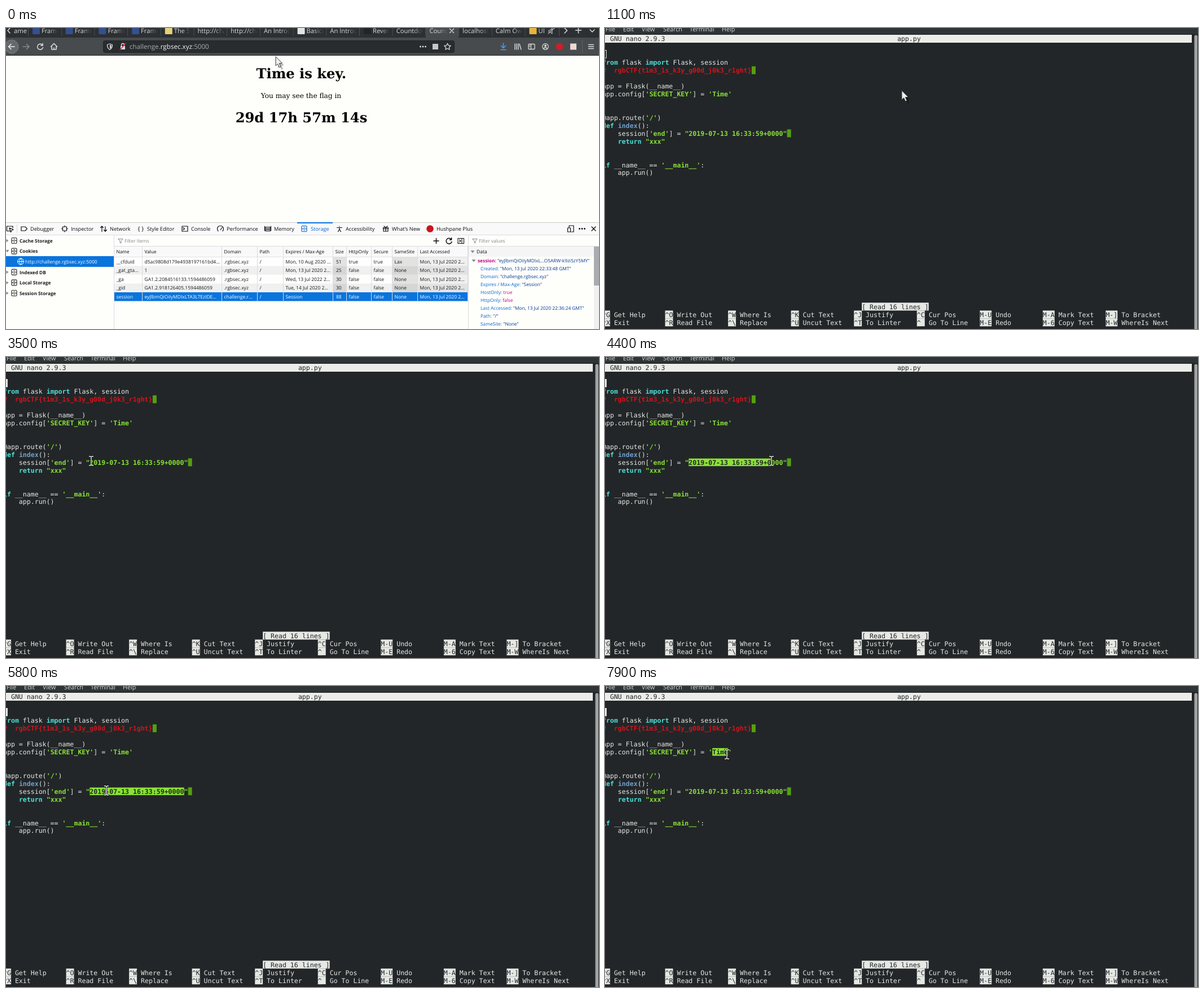
Write an HTML page that moves like this. It is 1051 by 533 pixels and loops after 8000 ms.

```html
<!DOCTYPE html>
<html lang="en">
<head>
<meta charset="utf-8">
<title>Time is key</title>
<style>
  html, body { margin: 0; width: 100%; height: 100%; overflow: hidden; background: #222628; }
  svg { display: block; }
  text { white-space: pre; text-rendering: geometricPrecision; font-family: "Open Sans", "Noto Sans", sans-serif; }
  .mono { font-family: "DejaVu Sans Mono", monospace; font-size: 11.577px; }
  .serif { font-family: "DejaVu Serif", "Noto Serif", serif; text-anchor: middle; }
  .b { font-weight: 700; }
</style>
</head>
<body>
<svg id="stage" width="1051" height="533" viewBox="0 0 1051 533"></svg>
<script>
const LOOP = 8000;
const rect = (x, y, w, h, fill, extra = '') =>
  `<rect x="${x}" y="${y}" width="${w}" height="${h}" fill="${fill}" ${extra}/>`;
const text = (x, y, s, size, fill, cls = '') =>
  `<text x="${x}" y="${y}" font-size="${size}" fill="${fill}" class="${cls}">${s}</text>`;
const line = (d, color, width = 1.2, fill = 'none') =>
  `<path d="${d}" stroke="${color}" stroke-width="${width}" fill="${fill}" stroke-linecap="round" stroke-linejoin="round"/>`;
const dot = (x, y, r, fill, extra = '') => `<circle cx="${x}" cy="${y}" r="${r}" fill="${fill}" ${extra}/>`;
const at = (x, y, s) => `<g transform="translate(${x} ${y})">${s}</g>`;

/* ---------- browser ---------- */
const INK = '#0c0c0d', LIGHT = '#dcdddd', BLUE = '#0a74dd', LINK = '#0a66cf', STRIP = '#2c3032', BAR = '#484b4d', EDGE = '#dcdce0';
const reload = (x, y, c) => at(x, y, line('M4 -3A5 5 0 1 0 5 1.5M4.6 -5.4V-2H1.2', c, 1.5));
const cross = (x, y, r, c) => at(x, y, line(`M${-r} ${-r}L${r} ${r}M${r} ${-r}L${-r} ${r}`, c, 1.4));
const plus = (x, y, r, c) => at(x, y, line(`M${-r} 0H${r}M0 ${-r}V${r}`, c, 1.5));
const dots = (x, y, c) => dot(x - 4.5, y, 1.4, c) + dot(x, y, 1.4, c) + dot(x + 4.5, y, 1.4, c);

function star(x, y, r) {
  const point = i => {
    const a = i * Math.PI / 5, d = i % 2 ? r / 2 : r;
    return `${x + d * Math.sin(a)} ${y - d * Math.cos(a)}`;
  };
  return line('M' + Array.from({ length: 10 }, (_, i) => point(i)).join('L') + 'Z', LIGHT);
}

function tabStrip() {
  const step = 58.7;
  const labels = 'Frame,Frame,Frame,Frame,The Sky,http://cha,http://cha,An Introd,Basics,An Introd,Reverse,Countdown,Countd,localhost,Calm Owl,UI'.split(',');
  const icons = { Frame: '#35508f', 'The Sky': '#e5d27a', Basics: '#e4e4e4', Reverse: '#222526', UI: '#e8b43c' };
  let s = rect(0, 0, 1051, 18, STRIP) + text(14, 9, 'ame', 11.2, LIGHT);
  labels.forEach((label, i) => {
    const active = label === 'Countd', bg = active ? BAR : STRIP, icon = icons[label], end = active ? 38 : 53;
    s += `<svg x="${39 + step * i}" y="0" width="${step}" height="18">` + rect(0, 0, step, 18, bg) +
      (icon ? rect(8, 0, 13, 11, icon, 'rx="1"') : '') + text(icon ? 24 : 7, 9, label, 11.2, LIGHT) +
      rect(end - 15, 0, 15, 17, `url(#${active ? 'fadeOn' : 'fadeOff'})`) + rect(end, 0, 30, 18, bg) +
      rect(0, 0, 1, 14, '#515557') + '</svg>';
  });
  s += rect(980, 0, 1, 14, '#515557') + rect(0, 0, 11, 17, STRIP) + line('M7 0L3 4.5L7 9', LIGHT, 1.5);
  s += line('M990 0L994.5 4.5L990 9', LIGHT, 1.5) + plus(1014.5, 4, 5, LIGHT) + line('M1035 3L1039 7L1043 3', LIGHT, 1.5);
  return s + cross(790, 5, 3.5, LIGHT) + line('M962 4H964L968 1V10L964 7H962ZM961 10L972 0', '#b8baba', 1.1);
}

function navBar() {
  let s = rect(0, 17, 1051, 32, BAR) + rect(0, 48, 1051, 1, '#2a2c2e');
  s += dot(10, 33, 12, '#66696b', 'stroke="#7c7f81"') + line('M15 33H5M9 28.5L4.5 33L9 37.5', '#eee', 1.6);
  s += line('M30 33H40M36.5 28.5L41 33L36.5 37.5', '#86898a', 1.6) + reload(60.5, 33, LIGHT);
  s += line('M79.5 33L85 27.5L90.5 33M81 33V38H89V33M85 38V35', LIGHT, 1.6);
  s += rect(172.5, 22.5, 622, 21, '#292c2e', 'rx="3" stroke="#222527"');
  s += line('M184 28L188.5 29.5Q188.5 36 184 38.5Q179.5 36 179.5 29.5Z', LIGHT, 1.3) + rect(184, 30, 2.5, 6, LIGHT);
  s += rect(203, 32, 8, 6, LIGHT) + line('M204.5 32V30A2.5 2.5 0 0 1 209.5 30V32', LIGHT, 1.3) + line('M202 38.5L212 27.5', '#e22850', 1.5);
  s += `<text x="219" y="37" font-size="11.65" fill="#a9acad">challenge.<tspan fill="#f4f4f4">rgbsec.xyz</tspan>:5000</text>`;
  s += dots(739, 33, LIGHT) + rect(756, 28, 10, 10, '#c4c6c7') + star(782.5, 33.3, 6);
  s += line('M881.5 27V35M877.5 31.5L881.5 35.5L885.5 31.5M877 38.5H886', '#45a1ff', 1.5);
  s += line('M902 28V38M905 28V38M908 28V38M910 28.5L913 38', LIGHT, 1.4);
  s += rect(926, 28.5, 11, 9, 'none', `rx="1" stroke="${LIGHT}" stroke-width="1.3"`) + line('M930.5 29V37M927.5 31H929M927.5 33H929', LIGHT);
  s += dot(956, 33, 5.3, 'none', `stroke="${LIGHT}" stroke-width="1.2"`) + dot(956, 31.5, 2, LIGHT) + line('M953 36Q956 33.5 959 36', LIGHT, 1.6);
  s += dot(981, 33, 6.3, '#d41c25') + rect(1000, 27.5, 11, 11, '#eed9d2') + rect(1021, 21, 1, 24, '#5f6264');
  return s + line('M1032.5 29.5h9m-9 3.5h9m-9 3.5h9', LIGHT, 1.5);
}

const drawer = (x, y, c) => at(x, y, rect(-4.5, -5, 9, 10, 'none', `rx="1.5" stroke="${c}" stroke-width="1.2"`) +
  line('M-4 0h8M-1 -2.5h2M-1 2.5h2', c, 1.1));

function toolTabs() {
  const tabs = {
    Debugger: 43, Inspector: 115, Network: 184, 'Style Editor': 250, Console: 328, Performance: 391,
    Memory: 475, Storage: 540, Accessibility: 602, 'What’s New': 684, 'Hushpane Plus': 763
  };
  const icon = (name, d) => at(tabs[name] - 11, 355.5, line(d, INK));
  let s = rect(0, 344, 1051, 1, '#c8c8cc') + rect(0, 345, 1051, 22, '#f9f9fa') + rect(0, 366, 1051, 1, EDGE) + rect(516, 344, 63, 2, BLUE);
  s += line('M7 359.5H1.5V351H12V354M6 354L13 357L10 358.5L8.5 361.5Z', INK) + rect(19, 348, 1, 15, EDGE);
  for (const name in tabs) s += text(tabs[name], 358.8, name, 9.2, name === 'Storage' ? LINK : INK);
  s += icon('Debugger', 'M-5 -3.5H2L5.5 0L2 3.5H-5Z');
  s += icon('Inspector', 'M-3.5 -3.5h7v7h-7ZM0 -5.5v2M0 3.5v2M-5.5 0h2M3.5 0h2');
  s += icon('Network', 'M-3 5V-4M-5.5 -2L-3 -4.5L-.5 -2M3 -4V5M.5 2L3 4.5L5.5 2');
  s += text(233.5, 359, '{ }', 10.5, INK);
  s += icon('Console', 'M-5 -4.5H5V4.5H-5ZM-3 -2L-.5 0L-3 2');
  s += icon('Performance', 'M-4 4A5.5 5.5 0 1 1 4 4M0 2L3 -2');
  s += icon('Memory', 'M-4 -3h8v7h-8ZM-2 -1v3M0 -1v3M2 -1v3M-5.5 -4.5v8M5.5 -4.5v8');
  s += drawer(528.5, 355.5, LINK);
  s += icon('Accessibility', 'M-4.5 -2h9M0 -2v3l-2.5 4M0 1l2.5 4M0 -4.5v.5');
  s += icon('What’s New', 'M-4.5 -2h9v2h-9ZM-4 0v4.5h8V0M0 4.5V-2l-3 -2.5M0 -2l3 -2.5');
  s += dot(751.5, 355.5, 6.3, '#c9151e') + line('M998 353V350H1006V361H1002M995.5 354h5v7h-5Z', INK);
  return s + dots(1021, 355.5, INK) + cross(1041.5, 355.5, 3.5, INK);
}

function sideBar() {
  let s = rect(191, 367, 1, 166, EDGE) + rect(0, 404, 191, 19, BLUE);
  ['Cache Storage', 'Cookies', '', 'Indexed DB', 'Local Storage', 'Session Storage'].forEach((name, i) => {
    const y = 376.5 + 18.6 * i, arrow = name === 'Cookies' ? 'M-2 -2H4L1 2.5Z' : 'M-1 -3L3 0L-1 3Z';
    if (name) s += text(24, y + 3.2, name, 8.3, '#1c1c1e', 'b') + drawer(14.5, y, '#2a2a2e') + at(1.5, y, `<path d="${arrow}" fill="#8b8b90"/>`);
  });
  return s + dot(26, 413.5, 5.5, 'none', 'stroke="#fff"') + at(26, 413.5, line('M-5.5 0h11M0 -5.5Q-5 0 0 5.5Q5 0 0 -5.5', '#fff', 1)) +
    text(34, 416.6, 'http://challenge.rgbsec.xyz:5000', 8.5, '#fff');
}

const funnel = x => at(x, 377, line('M-4 -3.5H4L1 .5V4L-1 3V.5Z', '#8b8b90', 1));

function cookieTable() {
  const cols = [192, 242, 383, 446, 492, 580, 604, 648, 685, 730, 819];
  const heads = 'Name,Value,Domain,Path,Expires / Max-Age,Size,HttpOnly,Secure,SameSite,Last Accessed'.split(',');
  const cookie = (name, value, expires, size, flag = 'false', site = 'None', domain = '.rgbsec.xyz') =>
    [name, value, domain, '/', expires, size, flag, flag, site, 'Mon, 13 Jul 2020 2...'];
  const rows = [
    cookie('__cfduid', 'd5ac9808d179e4938197161bd4...', 'Mon, 10 Aug 2020 ...', 51, 'true', 'Lax'),
    cookie('_gat_gta...', '1', 'Mon, 13 Jul 2020 2...', 25),
    cookie('_ga', 'GA1.2.2084516133.1594486059', 'Wed, 13 Jul 2022 2...', 30),
    cookie('_gid', 'GA1.2.918126405.1594486059', 'Tue, 14 Jul 2020 2...', 30),
    cookie('session', 'eyJlbmQiOiIyMDIxLTA3LTEzIDE...', 'Session', 88, 'false', 'None', 'challenge.r...')
  ];
  let s = funnel(203) + text(210, 380, 'Filter Items', 8.4, '#87878b') + plus(762.5, 377, 4.5, INK) + reload(785, 377, INK) +
    line('M801 372.5h10.5v9h-10.5ZM808 373v8M803.5 375l2.5 2l-2.5 2', INK, 1.1);
  s += rect(192, 386, 627, 20, '#f9f9fa') + rect(192, 386, 859, 1, EDGE) + rect(192, 405, 627, 1, EDGE);
  rows.forEach((row, r) => {
    const y = 405.8 + 15.55 * r, chosen = r === 4;
    s += rect(192, y, 627, 15.55, chosen ? BLUE : r % 2 ? '#f0f0f1' : '#fefefd');
    row.forEach((cell, c) => {
      const shade = { Size: .11, SameSite: .11, 'Last Accessed': .06 }[heads[c]];
      if (shade && !chosen) s += rect(cols[c], y, cols[c + 1] - cols[c], 15.55, `rgba(0,0,0,${shade})`);
      s += text(cols[c] + (c === 5 ? 5 : 3.5), y + 10.8, cell, 8.5, chosen ? '#fff' : '#18181a');
    });
  });
  heads.forEach((head, c) => s += text(cols[c] + 3.5, 399, head, 8.25, INK) + rect(cols[c + 1] - 1, 387, 1, 96, EDGE));
  return s;
}

function dataPanel() {
  const rows = {
    'Created:': '"Mon, 13 Jul 2020 22:33:48 GMT"', 'Domain:': '"challenge.rgbsec.xyz"', 'Expires / Max-Age:': '"Session"', 'HostOnly:': 'true',
    'HttpOnly:': 'false', 'Last Accessed:': '"Mon, 13 Jul 2020 22:36:24 GMT"', 'Path:': '"/"', 'SameSite:': '"None"'
  };
  const pair = (x, y, key, value, keyStyle) =>
    `<text x="${x}" y="${y}" font-size="8.3"><tspan ${keyStyle}>${key}</tspan> <tspan fill="${value[0] === '"' ? '#003a91' : '#c4008a'}">${value}</tspan></text>`;
  const open = (x, y) => at(x, y, '<path d="M-3.5 -2h7L0 2.5Z" fill="#8b8b90"/>');
  let s = rect(819, 367, 1, 166, EDGE) + funnel(831) + text(838, 380, 'Filter values', 8.4, '#87878b');
  s += rect(820, 387, 231, 18, '#f5f5f6') + open(827, 396) + text(834, 399, 'Data', 8.5, INK);
  s += open(829, 412) + pair(836, 415.2, 'session:', '"eyJlbmQiOiIyMDIxL...O5ARW-k9zi5zY5MY"', 'class="b" fill="#c4008a"');
  Object.keys(rows).forEach((key, i) => s += pair(841, 429.2 + 13.95 * i, key, rows[key], `fill="${LINK}"`));
  return s + rect(1042, 387, 9, 146, '#f0f0f0') + rect(1042, 387, 9, 69, '#a9abae');
}

const browser = () => rect(0, 0, 1051, 533, '#fefefb') + tabStrip() + navBar() +
  text(523.3, 89, 'Time is key.', 24.2, '#000', 'serif b') + text(523, 123.5, 'You may see the flag in', 12.15, '#000', 'serif') +
  `<text id="clock" x="523.5" y="167" font-size="24.2" class="serif b"></text>` +
  toolTabs() + sideBar() + cookieTable() + dataPanel();

/* ---------- terminal ---------- */
const DARK = '#222628', FG = '#e6e8e4', GREEN = '#8ae234', CYAN = '#4fdfd5', RED = '#d0141c', SPARE = '#54a010';
const CW = 6.972, RH = 13.95;
const colX = c => -5 + c * CW, rowY = r => 12.1 + r * RH;

const code = {
  3: [['from', CYAN], [' flask '], ['import', CYAN], [' Flask, session']],
  4: [['#  rgbCTF{t1m3_1s_k3y_g00d_j0k3_r1ght}', RED]],
  6: [['app = Flask(__name__)']],
  7: [['app.config['], ["'SECRET_KEY'", GREEN], ['] = '], ["'Time'", GREEN]],
  10: [['@app.route('], ["'/'", GREEN], [')']],
  11: [['def', CYAN], [' '], ['index', '#729fcf'], ['():']],
  12: [['    session['], ["'end'", GREEN], ['] = '], ['"2019-07-13 16:33:59+0000"', GREEN]],
  13: [['    '], ['return', CYAN], [' '], ['"xxx"', GREEN]],
  16: [['if', CYAN], [' __name__ == '], ["'__main__'", GREEN], [':']],
  17: [['    app.run()']]
};

function mono(row, col, s, fill = FG, bold = false, back = '') {
  return (back ? rect(colX(col), rowY(row), s.length * CW, RH, back) : '') +
    `<text x="${colX(col)}" y="${rowY(row) + 11.2}" fill="${fill}" class="mono${bold ? ' b' : ''}">${s}</text>`;
}

function codeRow(row, inverse) {
  let col = 0;
  return code[row].map(([s, color]) => {
    const out = mono(row, col, s, inverse ? DARK : color, !!color, inverse ? color || FG : '');
    col += s.length;
    return out;
  }).join('');
}

function terminal() {
  const keys = [
    '^G Get Help,^O Write Out,^W Where Is,^K Cut Text,^J Justify,^C Cur Pos,M-U Undo,M-A Mark Text,M-] To Bracket',
    '^X Exit,^R Read File,^\\ Replace,^U Uncut Text,^T To Linter,^_ Go To Line,M-E Redo,M-6 Copy Text,M-W WhereIs Next'
  ];
  const menu = { File: 1, Edit: 32, View: 65, Search: 103, Terminal: 150, Help: 207 };
  let s = rect(0, 0, 1051, 533, DARK) + rect(0, 0, 1051, 10.5, '#2f3537');
  for (const name in menu) s += text(menu[name], 5.7, name, 10.8, '#d6d8d6');
  s += rect(0, 12, 1040, 14, '#ecede8') + mono(0, 2, 'GNU nano 2.9.3', DARK) + mono(0, 75, 'app.py', DARK);
  s += rect(1044.5, 12.5, 5.5, 540, '#a0a4a3', 'rx="2.7"');
  s += Object.keys(code).map(r => codeRow(+r)).join('');
  s += rect(colX(38), rowY(4), CW, RH, SPARE) + rect(colX(47), rowY(12), CW, RH, SPARE);
  s += mono(34, 66, '[ Read 16 lines ]', DARK, false, FG);
  keys.forEach((list, i) => list.split(',').forEach((item, k) => {
    const n = item.indexOf(' ');
    s += mono(35 + i, 16 * k, item.slice(0, n), DARK, false, FG) + mono(35 + i, 16 * k + n + 1, item.slice(n + 1));
  }));
  return s + rect(-4.5, 39.5, 6.9, 13.5, 'none', `id="caret" stroke="${FG}"`) +
    `<g clip-path="url(#range)">${codeRow(7, true)}${codeRow(12, true)}</g>`;
}

/* ---------- pointer ---------- */
const ARROW = 'M0 0V16L3.6 12.7L6.4 18.8L9 17.6L6.3 11.7L11 11.3Z';
const BEAM = 'M-3.5 -8h2L0 -7L1.5 -8h2M0 -7V7M-3.5 8h2L0 7L1.5 8h2';
const pointer = `<g id="arrow"><path d="${ARROW}" transform="translate(4 4)" fill="#000" opacity=".28"/>${line(ARROW, '#3a3d3e', 1, '#efefec')}</g>` +
  `<g id="beam">${line(BEAM, '#15181a', 3)}${line(BEAM, '#f4f4f0', 1.3)}</g>`;

// Arrival time in tenths of a second, x, y and, if over 1, the steps the move takes.
const hover = [
  [0, 478, 51], [2, 466, 56], [6, 609, 72, 4], [9, 526, 111, 2], [16, 308, 182, 5], [19, 30, 104, 2],
  [20, 162, 95], [23, 15, 110, 2], [26, 70, 212, 2], [28, 121, 199, 2], [30, 126, 190]
];
const drag = [
  [33, 162, 186], [35, 151, 184, 2], [38, 165, 185], [41, 258, 187, 3], [44, 295, 184, 2],
  [46, 317, 179, 2], [51, 312, 185, 2], [53, 318, 185], [55, 188, 186]
];
const finish = [
  [57, 166, 184], [58, 178, 185], [61, 168, 186], [62, 250, 188], [72, 194, 117, 9],
  [73, 203, 117], [75, 212, 123], [77, 216, 119], [78, 219, 120], [79, 216, 121]
];
const moves = hover.concat(drag, finish);

function pointerAt(t) {
  let x = 0, y = 0;
  for (const [end, toX, toY, steps = 1] of moves) {
    const k = Math.max(0, Math.min(1, (t / 100 - end) / steps + 1));
    x += (toX - x) * k;
    y += (toY - y) * k;
  }
  return [x, y];
}

// row, first column, last column
function selectionAt(t, x) {
  const col = Math.round((x + 5) / CW);
  if (t >= 7300) return [7, 28, Math.min(col, 32)];
  if (t < 3800 || t >= 7000) return [0, 0, 0];
  if (t >= 4600 && t < 4800) return [12, 0, 22];
  return [12, 22, t < 4600 ? col : t < 5000 ? 47 : 46];
}

const fade = (id, c) => `<linearGradient id="${id}"><stop stop-color="${c}" stop-opacity="0"/><stop offset="1" stop-color="${c}"/></linearGradient>`;
const $ = id => document.getElementById(id);
$('stage').innerHTML = `<defs>${fade('fadeOn', BAR)}${fade('fadeOff', STRIP)}<clipPath id="range"><rect id="span" height="${RH}"/></clipPath></defs>` +
  `<g id="browser">${browser()}</g><g id="terminal">${terminal()}</g><g id="pointer">${pointer}</g>`;

const show = (id, on) => $(id).setAttribute('display', on ? 'inline' : 'none');

function draw(ms) {
  const t = Math.floor(ms % LOOP / 100) * 100;
  const [x, y] = pointerAt(t), inTerminal = t >= 1100;
  show('browser', !inTerminal);
  show('terminal', inTerminal);
  show('arrow', t < 1200);
  show('beam', t >= 1200);
  $('pointer').setAttribute('transform', `translate(${x} ${y})`);
  $('clock').textContent = `29d 17h 57m ${t < 400 ? 14 : 13}s`;
  $('caret').setAttribute('fill', t < 1500 ? 'none' : FG);
  const [row, from, to] = selectionAt(t, x), span = $('span');
  span.setAttribute('x', colX(from));
  span.setAttribute('y', rowY(row));
  span.setAttribute('width', Math.max(0, to - from) * CW);
}

const start = performance.now();
function tick() {
  draw(Math.max(0, performance.now() - start));
  requestAnimationFrame(tick);
}
tick();
</script>
</body>
</html>
```
